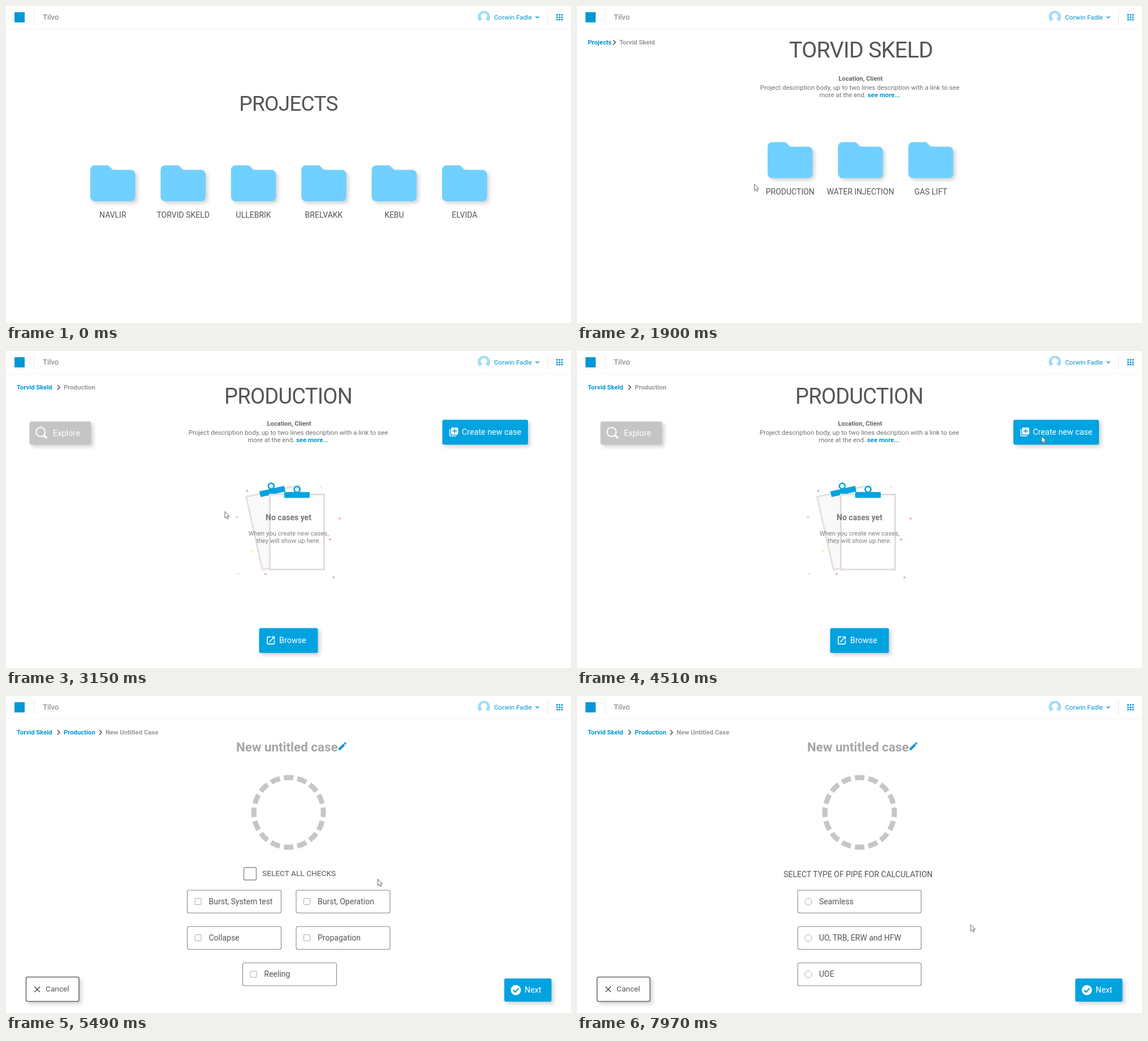
Write an HTML page that moves like this. It is 999 by 560 pixels and loops after 8000 ms.

```html
<!DOCTYPE html>
<html lang="en">
<head>
<meta charset="utf-8">
<title>Case wizard</title>
<style>
html, body { margin: 0; width: 100%; height: 100%; overflow: hidden; background: #fff; }
svg { display: block; width: 100%; height: 100%; font-family: Roboto, "Open Sans", sans-serif; }
.mid { text-anchor: middle; }
.bold { font-weight: 700; }
.title { letter-spacing: -.02em; text-anchor: middle; }
.shade { filter: drop-shadow(4px 4px 3px rgba(0, 0, 0, .17)); }
.line { fill: none; }
</style>
</head>
<body>
<svg id="stage" viewBox="0 0 999 560"></svg>
<script>
const BLUE = '#00a3e0', LINK = '#0096d0', GREY = '#999', INK = '#555';

const text = (x, y, s, size, fill = INK, cls = '') =>
  `<text x="${x}" y="${y}" font-size="${size}" fill="${fill}" class="${cls}">${s}</text>`;
const title = (x, y, s, size) => text(x, y, s, size, INK, 'title');
const rect = (x, y, w, h, r, fill, more = '') =>
  `<rect x="${x}" y="${y}" width="${w}" height="${h}" rx="${r}" fill="${fill}" ${more}/>`;
const dot = (x, y, r, fill, more = '') => `<circle cx="${x}" cy="${y}" r="${r}" fill="${fill}" ${more}/>`;
const line = (points, color, width) =>
  `<polyline class="line" points="${points}" stroke="${color}" stroke-width="${width}"/>`;
const icon = (x, y, fill, d) => `<path transform="translate(${x} ${y}) scale(.78)" fill="${fill}" d="${d}"/>`;
const stroke = (color, width) => `stroke="${color}" stroke-width="${width}"`;
const button = (x, y, w, h, fill, more = '') => rect(x, y, w, h, 3, fill, `class="shade" ${more}`);

const folder = (x, y, name) =>
  `<path class="shade" transform="translate(${x} ${y})" fill="#70d0ff"
    d="M8 0H31.5L39.5 8H71.5a8 8 0 0 1 8 8V55.5a8 8 0 0 1 -8 8H8a8 8 0 0 1 -8 -8V8a8 8 0 0 1 8 -8Z"/>` +
  text(x + 39.8, y + 92.5, name, 14, INK, 'mid');
const folders = (x, y, names) => names.map((n, i) => folder(x + i * 124.4, y, n)).join('');

// Each crumb is [x, label]; the last one is the current page.
const crumbs = list => list.map(([x, s], i) =>
  (i ? line(`${x - 11},60 ${x - 7},64.2 ${x - 11},68.4`, INK, 1.6) : '') +
  text(x, 68, s, 11.3, i < list.length - 1 ? LINK : GREY, 'bold')).join('');

const about = x =>
  text(x + 1.5, 132, 'Location, Client', 11.1, '#666', 'mid bold') +
  text(x, 148, 'Project description body, up to two lines description with a link to see', 11.55, '#707070', 'mid') +
  text(x, 161, `more at the end. <tspan class="bold" fill="${LINK}">see more...</tspan>`, 11.4, '#707070', 'mid');

function header() {
  let s = rect(0, 40, 999, 1, 0, '#f5f5f5') + rect(15, 11, 18, 18, 0, '#0097d6') +
    rect(49.5, 7, 1, 26, 0, '#e6e6e6') + rect(957, 7, 1, 26, 0, '#e6e6e6') +
    text(65, 24.3, 'Tilvo', 13.3, '#777') +
    dot(845, 19.5, 11, '#a3dcf4') + dot(845, 18, 5.6, '#fff') +
    '<path d="M836.5 29Q837.5 25 842.5 23.8V21h5V23.8Q852.5 25 853.5 29Q850 31 845 31Q840 31 836.5 29Z" fill="#fff"/>' +
    text(863, 23.7, 'Corwin Fadle', 11.6, LINK) +
    line('936.5,18.3 939.5,21.3 942.5,18.3', LINK, 1.5);
  for (let i = 0; i < 9; i++) s += dot(974.4 + i % 3 * 4.3, 15.5 + (i / 3 | 0) * 4.3, 1.6, LINK);
  return s;
}

const projects = () =>
  title(499.5, 185, 'PROJECTS', 37) +
  folders(149, 281.5, ['NAVLIR', 'TORVID SKELD', 'ULLEBRIK', 'BRELVAKK', 'KEBU', 'ELVIDA']);

const project = () =>
  crumbs([[19, 'Projects'], [75, 'Torvid Skeld']]) +
  title(502, 91, 'TORVID SKELD', 39.5) + about(500) +
  folders(337, 240.5, ['PRODUCTION', 'WATER INJECTION', 'GAS LIFT']);

const clip = (x, y, turn) => `<g transform="translate(${x} ${y}) rotate(${turn})">` +
  rect(-22.5, -5, 45, 10.3, 0, BLUE) + dot(0, -9.7, 5, '#fff', stroke(BLUE, 2.6)) + '</g>';

function clipboards() {
  const specks = [
    [426.5, 247, '#9bb8ec'], [509, 228, '#e3f3e8'], [555.5, 240.5, '#f7eeaa'], [408.5, 293.5, '#a5e6ee'],
    [590, 296, '#f29d93'], [573, 333, '#f08f8f'], [436, 353.5, '#f7ee9f'], [410.5, 394, '#c9f0f3'],
    [459, 394, '#f09aa5'], [579, 400, '#9bb8ec']];
  return specks.map(([x, y, c]) => dot(x, y, 1.8, c)).join('') +
    `<path d="M424.5 257.5L519 237L548 366L453.5 386.5Z" fill="#f9f9f9" ${stroke('#dedede', 2.6)}/>` +
    clip(471, 248, -12.5) +
    rect(466.5, 253.5, 96, 132.5, 0, '#fff', stroke('#dedede', 3)) +
    clip(514.5, 254.2, 0) +
    text(499.5, 299, 'No cases yet', 14, '#777', 'mid bold') +
    text(499.5, 326, 'When you create new cases,', 11.3, '#808080', 'mid') +
    text(499.5, 339, 'they will show up here.', 11.3, '#808080', 'mid');
}

const production = () =>
  crumbs([[19, 'Torvid Skeld'], [102, 'Production']]) +
  title(499, 93.3, 'PRODUCTION', 38) + about(499) +
  button(41.5, 124.5, 109, 41, '#c5c5c5') +
  dot(61.2, 143, 8, 'none', stroke('#fff', 2.1)) + line('67,148.8 72.2,154', '#fff', 3.6) +
  text(83, 149.6, 'Explore', 14.5, '#fff') +
  button(771.5, 121.5, 151.5, 44, BLUE) +
  icon(782.4, 133.6, '#fff', 'M4 6H2v14c0 1.1.9 2 2 2h14v-2H4V6zm16-4H8c-1.1 0-2 .9-2 2v12c0 1.1.9 2 2 2h12c1.1 0 2-.9 2-2V4c0-1.1-.9-2-2-2zm-1 9h-4v4h-2v-4H9V9h4V5h2v4h4v2z') +
  text(806, 148, 'Create new case', 14.3, '#fff') +
  clipboards() +
  button(447.5, 489.5, 104, 44, BLUE) +
  icon(458.8, 502, '#fff', 'M19 19H5V5h7V3H5c-1.1 0-2 .9-2 2v14c0 1.1.9 2 2 2h14c1.1 0 2-.9 2-2v-7h-2v7zM14 3v2h3.6l-9.8 9.8 1.4 1.4L19 6.4V10h2V3h-7z') +
  text(483, 516, 'Browse', 14.4, '#fff');

const wizard = () =>
  crumbs([[19, 'Torvid Skeld'], [102, 'Production'], [176, 'New Untitled Case']]) +
  text(407, 97.5, 'New untitled case', 22.4, '#a6a6a6', 'bold') +
  icon(585.6, 79.3, LINK, 'M3 17.2V21h3.8L17.8 9.9l-3.7-3.7L3 17.2zM20.7 7a1 1 0 0 0 0-1.4l-2.3-2.3a1 1 0 0 0-1.4 0l-1.9 1.8 3.8 3.8 1.8-1.9z') +
  dot(499.7, 205.5, 61.5, 'none', stroke('#c6c6c6', 9) +
    ' pathLength="16" stroke-dasharray=".7 .3" stroke-dashoffset=".35"') +
  button(35.5, 496.5, 93.5, 43, '#fff', stroke('#666', 1.5)) +
  line('50.5,513.5 60,523', '#444', 1.4) + line('60,513.5 50.5,523', '#444', 1.4) +
  text(70, 522.4, 'Cancel', 13.7) +
  button(881, 499, 83.5, 41, BLUE) +
  dot(901.5, 519.5, 9, '#fff') + line('897,519.7 900.3,523 906.3,516.5', BLUE, 2.4) +
  text(917, 524.3, 'Next', 14.3, '#fff');

function checks(on) {
  const options = [[320.5, 343, 'Burst, System test'], [513, 343, 'Burst, Operation'],
    [320.5, 407.2, 'Collapse'], [513, 407.2, 'Propagation'], [418.5, 471.5, 'Reeling']];
  return rect(420.5, 303, 22, 22, 2, '#fff', stroke('#8a8a8a', 1.4)) +
    (on ? line('426,315 430.3,319.5 437.5,309', LINK, 2.5) : '') +
    text(453, 318.4, 'SELECT ALL CHECKS', 13.7) +
    options.map(([x, y, s]) =>
      rect(x, y, 166, 40.3, 3, on ? '#f1f1f1' : '#fff', stroke('#888', 1.1)) +
      rect(x + 13.5, y + 14.5, 11, 11, 1, '#fff', stroke('#aaa', 1)) +
      (on ? line(`${x + 16},${y + 20} ${x + 18.3},${y + 22.5} ${x + 22.3},${y + 17}`, LINK, 1.7) : '') +
      text(x + 38, y + 24.6, s, 14)).join('');
}

const pipes = () =>
  text(497, 319.5, 'SELECT TYPE OF PIPE FOR CALCULATION', 14, INK, 'mid') +
  ['Seamless', 'UO, TRB, ERW and HFW', 'UOE'].map((s, i) => {
    const y = 343 + i * 64.25;
    return rect(390.3, y, 218.2, 40.3, 3, '#fff', stroke('#888', 1.1)) +
      dot(409, y + 20.2, 6, '#fff', stroke('#aaa', 1)) + text(428, y + 24.6, s, 14);
  }).join('');

const screens = [
  [0, projects()], [1900, project()], [3150, production()],
  [4600, wizard() + checks(false)], [6440, wizard() + checks(true)], [7500, wizard() + pipes()]];

// Pointer moves: first and last step time, number of steps, end point.
const START = [839, 260], SHOWN = 930;
const moves = [
  [1025, 1510, 6, 308, 316], [1690, 1690, 1, 313, 314], [2580, 3055, 6, 386.5, 283],
  [3650, 4030, 5, 826, 126], [4220, 4510, 4, 821, 150], [5010, 5490, 6, 657, 323],
  [5690, 5960, 4, 543, 317], [6150, 6340, 3, 430, 312], [6630, 6820, 3, 671, 412],
  [6910, 6910, 1, 774, 447], [7000, 7200, 3, 937, 521], [7590, 7970, 5, 695.5, 403.5]];

function pointerAt(t) {
  let [x, y] = START;
  for (const [from, to, steps, endX, endY] of moves) {
    if (t < from) break;
    const gap = (to - from) / Math.max(1, steps - 1);
    const k = t >= to ? 1 : (Math.floor((t - from) / gap) + 1) / steps;
    const ease = .5 * k + .5 * k * k * (3 - 2 * k);
    x += (endX - x) * ease;
    y += (endY - y) * ease;
  }
  return [x, y];
}

const stage = document.getElementById('stage');
stage.innerHTML = header() + screens.map(s => `<g class="screen">${s[1]}</g>`).join('') +
  `<path id="pointer" d="M.5 .5V12L3.1 9.6L4.9 13.6L6.9 12.7L5.2 8.8H8.7Z" fill="#fff" ${stroke('#555', .9)}/>`;
const groups = stage.querySelectorAll('.screen');
const pointer = document.getElementById('pointer');

function draw() {
  const t = performance.now() % 8000;
  const current = screens.filter(s => t >= s[0]).length - 1;
  groups.forEach((g, i) => g.style.display = i === current ? '' : 'none');
  pointer.style.display = t < SHOWN ? 'none' : '';
  pointer.setAttribute('transform', `translate(${pointerAt(t)})`);
  requestAnimationFrame(draw);
}
draw();
</script>
</body>
</html>
```
